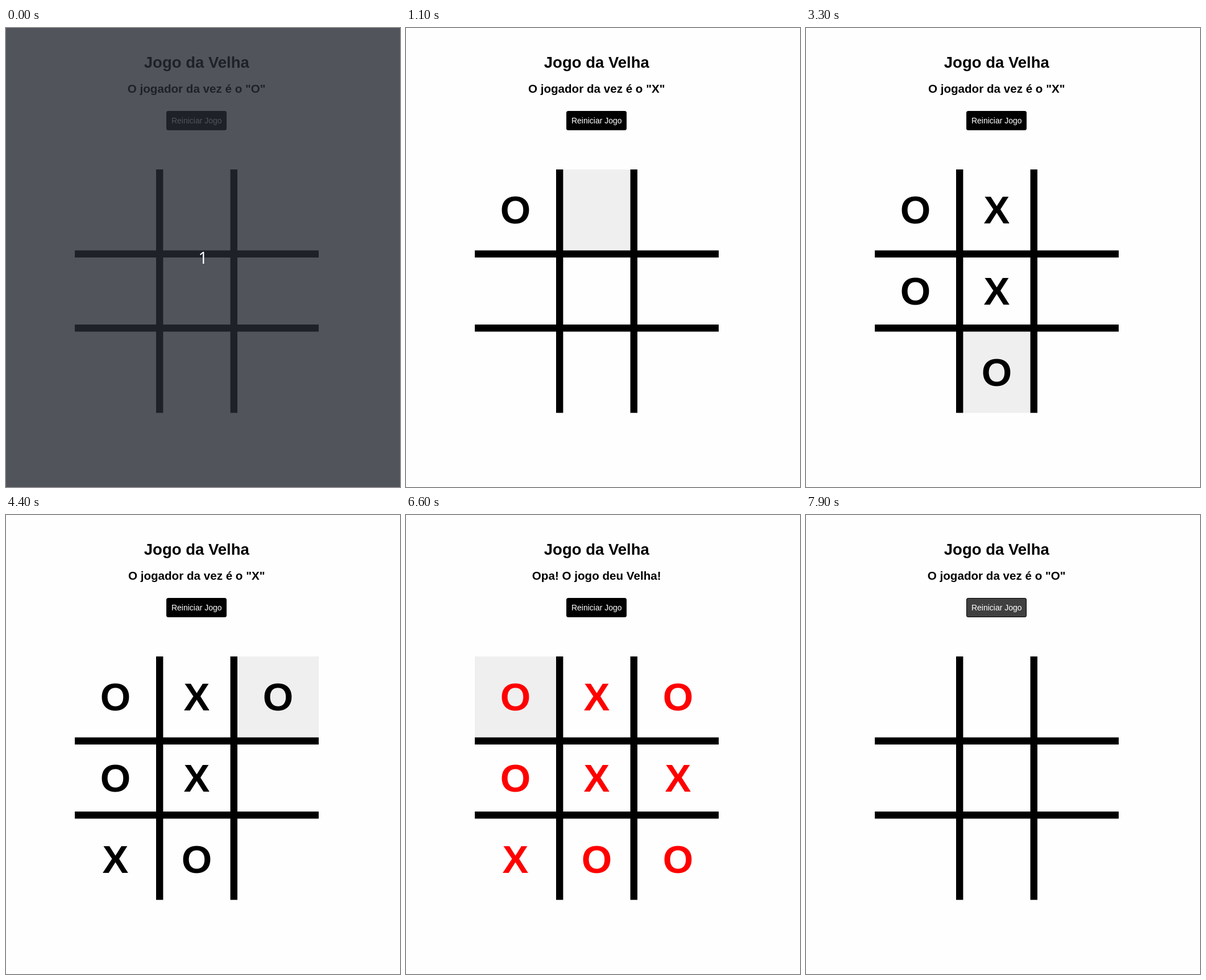
Animation of 693x808 px, one loop 8000 ms. Source, as an HTML page:

```html
<!DOCTYPE html>
<html lang="pt-BR">
<head>
<meta charset="utf-8">
<title>Jogo da Velha</title>
<style>
  html, body { margin: 0; width: 100%; height: 100%; overflow: hidden; background: #fefefe; }
  svg { display: block; width: 693px; height: 808px; }
  text { font-family: "Liberation Sans", Arial, sans-serif; text-anchor: middle; }
  .bold { font-weight: bold; }
  #marks { font-size: 68.75px; }
  #count { font-family: "Open Sans", "Noto Sans", sans-serif; font-size: 29px; fill: #fff; }
</style>
</head>
<body>
<svg id="stage" viewBox="0 0 693 808">
  <rect id="page" width="693" height="808"/>
  <rect id="hover" fill="#efefef"/>
  <g id="ink">
    <text class="bold" x="335.3" y="69.7" font-size="27.5">Jogo da Velha</text>
    <text class="bold" id="status" x="335.2" y="114" font-size="20.625"></text>
    <path d="M264 249h12.4v428.5h-12.4zM394.6 249h12.4v428.5h-12.4zM121 391.6h429v12.4h-429zM121 522h429v12.4h-429z"/>
    <rect x="282" y="146" width="106" height="34" rx="3.5"/>
  </g>
  <rect id="face" x="283" y="147" width="104" height="32" rx="2.5" fill="#404040"/>
  <text id="label" x="335.3" y="168" font-size="14">Reiniciar Jogo</text>
  <g id="marks" class="bold"></g>
  <text id="count" x="346.5" y="415">1</text>
</svg>
<script>
const LOOP = 8000, CELL = 143, LEFT = 121, TOP = 249;
const COUNT_END = 100, DRAW = 5800, BUTTON_HOVER = 7300, RESET = 7900;

// [time, cell]; players alternate, "O" starts
const moves = [[1000, 0], [1400, 1], [2000, 3], [2600, 4], [3300, 7],
  [3900, 6], [4400, 2], [5100, 5], [DRAW, 8]];

// [time, cell under the pointer], -1 for none
const pointer = [[0, -1], [700, 0], [1100, 1], [1600, 4], [1700, 3], [2200, 4],
  [2900, 7], [3600, 6], [4000, 2], [4500, 5], [5300, 8], [6400, 4], [6500, 3],
  [6600, 0], [6700, 3], [6900, 0], [7100, -1]];

const el = id => document.getElementById(id);
const set = (node, attrs) => {
  for (const key in attrs) node.setAttribute(key, attrs[key]);
};
const show = (node, on) => set(node, { visibility: on ? "visible" : "hidden" });
const player = n => n % 2 ? "X" : "O";

const marks = moves.map(([, cell], i) => {
  const mark = document.createElementNS("http://www.w3.org/2000/svg", "text");
  set(mark, {
    x: LEFT + CELL * (cell % 3 + 0.5),
    y: TOP + 95 + CELL * Math.floor(cell / 3)
  });
  mark.textContent = player(i);
  return el("marks").appendChild(mark);
});

// Inner edges of the grid lines, so the highlight never shows beneath them
const spanX = [[121, 264], [276.4, 394.6], [407, 550]];
const spanY = [[249, 391.6], [404, 522], [534.4, 677.5]];

function drawHover(cell) {
  show(el("hover"), cell >= 0);
  if (cell < 0) return;
  const [x0, x1] = spanX[cell % 3], [y0, y1] = spanY[Math.floor(cell / 3)];
  set(el("hover"), { x: x0, y: y0, width: x1 - x0, height: y1 - y0 });
}

function render(t) {
  const dim = t < COUNT_END, reset = t >= RESET;
  const drawn = t >= DRAW && !reset;
  const played = reset ? 0 : moves.filter(([at]) => t >= at).length;

  set(el("page"), { fill: dim ? "#51545b" : "#fefefe" });
  set(el("ink"), { fill: dim ? "#1e2128" : "#000" });
  set(el("label"), { fill: dim ? "#51545b" : "#fff" });
  show(el("count"), dim);
  show(el("face"), t >= BUTTON_HOVER);

  el("status").textContent = drawn
    ? "Opa! O jogo deu Velha!"
    : `O jogador da vez é o "${player(played)}"`;

  set(el("marks"), { fill: drawn ? "#f00" : "#000" });
  marks.forEach((mark, i) => show(mark, i < played));
  drawHover(pointer.filter(([at]) => t >= at).pop()[1]);
}

const start = performance.now();
function tick() {
  render((performance.now() - start) % LOOP);
  requestAnimationFrame(tick);
}
tick();
</script>
</body>
</html>
```
